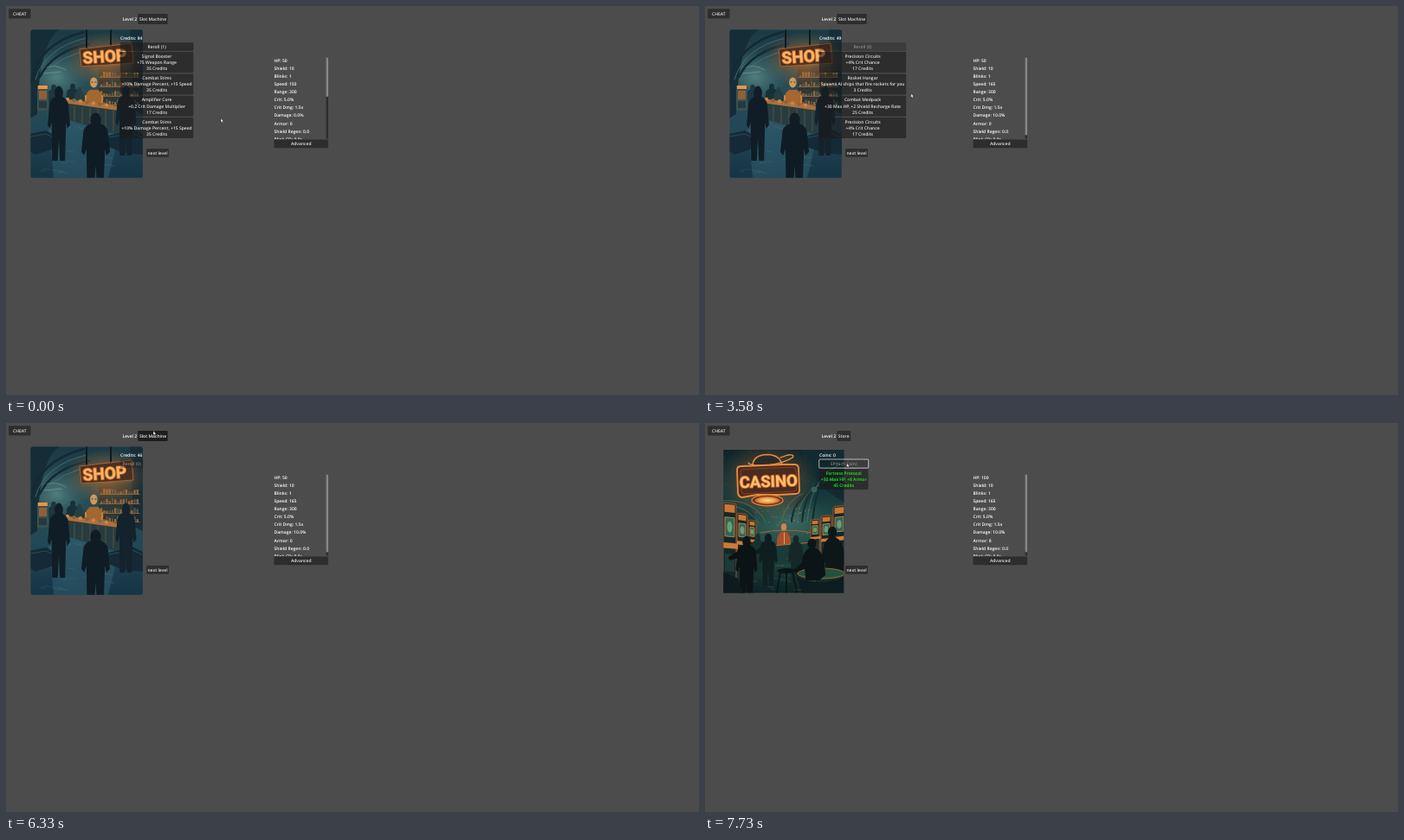
Recreate the animation shown at these times as an HTML page. Size 800 px wide and 450 px high, loop 8 s.

```html
<!DOCTYPE html>
<html lang="en">
<head>
<meta charset="utf-8">
<title>Level shop</title>
<style>
  html, body { margin: 0; width: 100%; height: 100%; overflow: hidden; background: #4c4c4c; }
  #stage { display: block; width: 100vw; height: 100vh; }
  text { font: 600 5px "Open Sans", "Noto Sans", sans-serif; fill: #fff; text-rendering: geometricPrecision; }
  .mid { text-anchor: middle; }
  .sign { font-family: Roboto, sans-serif; font-weight: 700; text-anchor: middle; stroke-linejoin: round; paint-order: stroke; }
</style>
</head>
<body>
<svg id="stage" viewBox="0 0 800 450" xmlns="http://www.w3.org/2000/svg">
  <defs>
    <clipPath id="list"><rect x="309" y="59.4" width="60" height="94.6"/></clipPath>
    <clipPath id="shopEdge"><rect x="28.5" y="27.5" width="129.3" height="171.3" rx="2"/></clipPath>
    <clipPath id="casinoEdge"><rect x="21.3" y="31" width="139" height="165.6"/></clipPath>
    <linearGradient id="shopAir" x2="0" y2="1">
      <stop offset="0" stop-color="#1b3944"/><stop offset=".35" stop-color="#294c55"/>
      <stop offset=".65" stop-color="#224857"/><stop offset="1" stop-color="#153343"/>
    </linearGradient>
    <linearGradient id="casinoAir" x2="0" y2="1">
      <stop offset="0" stop-color="#0f2429"/><stop offset=".3" stop-color="#15363a"/>
      <stop offset=".55" stop-color="#28524a"/><stop offset=".75" stop-color="#1f463f"/><stop offset="1" stop-color="#0c2024"/>
    </linearGradient>
    <radialGradient id="amber"><stop stop-color="#f08a35" stop-opacity=".6"/><stop offset="1" stop-color="#d0702a" stop-opacity="0"/></radialGradient>
    <radialGradient id="mist"><stop stop-color="#74a7a0" stop-opacity=".55"/><stop offset="1" stop-color="#4d807e" stop-opacity="0"/></radialGradient>
    <radialGradient id="lamp"><stop stop-color="#ffd68c"/><stop offset=".6" stop-color="#f0a14b"/><stop offset="1" stop-color="#b9602a"/></radialGradient>
  </defs>
  <g id="shop" clip-path="url(#shopEdge)"></g>
  <g id="casino" clip-path="url(#casinoEdge)"></g>
  <g id="ui"></g>
  <path id="cursor" d="M0 0V4.7L1.1 3.7 1.9 5.4 2.7 5 1.9 3.4H3.4Z" fill="#fff" stroke="#111" stroke-width=".4"/>
</svg>
<script>
const LOOP = 8000;
const $ = id => document.getElementById(id);

// ---- shape helpers ----
const rect = (x, y, w, h, fill, more = '') => `<rect x="${x}" y="${y}" width="${w}" height="${h}" fill="${fill}" ${more}/>`;
const oval = (x, y, rx, ry, fill, more = '') => `<ellipse cx="${x}" cy="${y}" rx="${rx}" ry="${ry}" fill="${fill}" ${more}/>`;
const area = (d, fill, more = '') => `<path d="${d}" fill="${fill}" ${more}/>`;
const line = (d, color, width = 1, more = '') => `<path d="${d}" fill="none" stroke="${color}" stroke-width="${width}" stroke-linecap="round" ${more}/>`;
const label = (x, y, s, more = '') => `<text x="${x}" y="${y + 1.8}" ${more}>${s}</text>`;
const sign = (x, y, turn, size, fill, edge, s) =>
  `<text class="sign" transform="translate(${x} ${y}) rotate(${turn})" style="font-size:${size}px;fill:${fill};stroke:${edge};stroke-width:1.8">${s}</text>`;

function seeded(seed) {
  return () => (seed = (seed * 16807) % 2147483647) / 2147483647;
}

// Silhouettes live in a box 100 units high
const STANDING = 'M-4 13H4Q15 16 17 24L20 52 15 57 13 48 11 100H2L0 70-2 100H-12L-13 48-16 57-20 52-17 24Q-15 16-4 13Z';
const LEANING = 'M-5 17H6Q21 24 24 44L26 70 14 80H-12L-14 58-32 66-36 61-20 46Q-17 24-5 17Z';
const figure = (x, y, h, fill, shape = STANDING, wide = 1) =>
  `<g transform="translate(${x} ${y}) scale(${h / 100 * wide} ${h / 100})" fill="${fill}">
   <ellipse cy="9" rx="${shape === LEANING ? 8.5 : 7.5}" ry="9.5"/><path d="${shape}"/></g>`;

// ---- paintings ----
function paintShop() {
  const rnd = seeded(41);
  let s = rect(28, 27, 131, 173, 'url(#shopAir)');
  s += oval(58, 82, 38, 32, 'url(#mist)');
  s += area('M28 27H62Q38 42 36 125L28 130Z', '#152d37');
  for (let i = 0; i < 4; i++) {
    s += line(`M${29 + i * 5} ${88 - i * 3}Q${36 + i * 9} ${44 + i * 4} ${90 + i * 3} ${30 + i * 7}`, i % 2 ? '#4d7476' : '#122a34', i % 2 ? .8 : 2.5);
  }
  s += line('M47 71Q57 67 69 74M44 78L64 76', '#8bb0a4', .8, 'opacity=".6"');
  // shelves with goods
  s += rect(107, 70, 51, 48, '#2d3837') + area('M143 27H158V125L148 120Z', '#182e36');
  for (const y of [82, 93, 104, 114]) {
    for (let x = 109; x < 153; x += 3.2) {
      const h = 2 + rnd() * 4;
      s += rect(x, y - h, 2.3, h, rnd() > .45 ? '#96673a' : '#52564a');
    }
    s += line(`M108 ${y + .5}H154`, '#a86f3a', .8);
  }
  // hanging sign
  s += oval(115, 62, 48, 32, 'url(#amber)');
  s += line('M93 27V50M121 27V47', '#10191e', 2);
  s += area('M85 50L145 43 147 66 87 70Z', '#4a3022', 'stroke="#a9622e" stroke-width="1" stroke-linejoin="round"');
  s += sign(114.3, 65, -4, 19, '#f9b566', '#c9692c', 'SHOP');
  // keeper and counter
  s += figure(77, 90, 40, '#17313a') + figure(55, 91, 38, '#1b3740') + figure(85, 94, 32, '#243f44');
  s += area('M90 120Q90 101 97 97H106Q113 101 112 121Z', '#a4672f') + oval(101.3, 88.5, 4.2, 6, '#cf9a5c');
  s += line('M99 88H100M103 88H104', '#3a2c25', 1) + line('M92 104Q91 113 99 115M111 104Q113 113 105 116', '#c9853f', 2);
  s += area('M66 110L130 119V148L66 130Z', '#263c41') + area('M66 107L130 116V121L66 112Z', '#b0703a');
  for (let i = 0; i < 7; i++) s += oval(71 + i * 7.5, 108 + i * 1.1, 2.2, 2.2, i % 2 ? '#8e6338' : '#cc8545');
  for (let x = 70; x < 128; x += 9) s += line(`M${x} ${114 + (x - 66) / 8}V${130 + (x - 66) / 4}`, '#b06c36', .7, 'opacity=".6"');
  // left kiosk
  s += rect(36, 92, 13, 29, '#3b514f') + rect(37, 92, 11, 4, '#ef9347') + rect(38, 98, 9, 10, '#8f5f3a') + rect(38, 110, 9, 8, '#233b40');
  // floor
  s += area('M48 124L66 130 130 150 118 199H55Z', '#376777', 'opacity=".45"');
  for (let i = 0; i < 26; i++) {
    const x = 40 + rnd() * 90, y = 138 + rnd() * 55;
    s += line(`M${x} ${y}l${4 + rnd() * 8} ${rnd() * 2}`, i % 3 ? '#4b7b85' : '#b17848', .7, 'opacity=".35"');
  }
  s += area('M28 148L46 144 58 151V164L34 172 28 168Z', '#142a36') + area('M118 150L146 143 158 149V172L136 170 118 163Z', '#142a36');
  s += line('M28 151L46 148 57 153M119 152L146 147 157 152', '#375864', .7);
  s += figure(61, 93, 86, '#101d27', STANDING, .75) + figure(138.5, 93, 80, '#13222b', STANDING, .75);
  s += figure(103.5, 124, 86, '#0f1c26', STANDING, .96);
  return s;
}

function slotMachine(x, y, w, h, lean) {
  return `<g transform="translate(${x} ${y}) skewY(${lean})">`
    + rect(0, 0, w, h, '#13262a', 'rx="2" stroke="#a95a2a" stroke-width=".9"')
    + rect(1.5, 1.5, w - 3, h * .1, '#c97733') + rect(2, h * .18, w - 4, h * .24, '#2f6656', 'stroke="#e08a3f" stroke-width=".8"')
    + oval(w / 2, h * .3, w * .2, h * .07, '#6d9c72')
    + rect(0, h * .5, w + 2, h * .07, '#cf7a38', 'rx="1"') + rect(2, h * .64, w - 4, h * .22, '#1d3a39') + '</g>';
}

function paintCasino() {
  const rnd = seeded(77);
  let s = rect(21, 31, 140, 166, 'url(#casinoAir)');
  for (let i = 0; i < 60; i++) s += oval(22 + rnd() * 138, 32 + rnd() * 60, .35, .35, '#6d9b8e', 'opacity=".6"');
  s += oval(98, 112, 45, 30, 'url(#mist)', 'opacity=".55"');
  // vaulted hall
  s += area('M112 31Q116 66 161 92V31Z', '#122b30') + area('M21 84Q52 84 60 116L21 120Z', '#17383a');
  for (let i = 0; i < 5; i++) {
    s += line(`M${100 + i * 6} 114Q${102 + i * 7} ${76 - i * 6} 161 ${70 - i * 8}`, i % 2 ? '#4a7a6b' : '#122d30', i % 2 ? .7 : 2);
  }
  s += line('M21 90Q56 88 70 114M21 96Q48 94 62 116', '#47766a', .8);
  s += line('M88 114Q94 90 112 82', '#8a6a42', .7) + oval(126, 77, 3.5, 3.5, '#31605a');
  for (let i = 0; i < 45; i++) s += rect(58 + rnd() * 68, 98 + rnd() * 34, 1.6, 1, rnd() > .5 ? '#bd7237' : '#447565', 'opacity=".75"');
  // neon sign
  s += oval(72, 66, 58, 46, 'url(#amber)', 'opacity=".75"');
  s += area('M55 50Q55 37 72 36.5 87 37 89 49Z', '#2a2b29', 'stroke="#e8833a" stroke-width="1.7"');
  s += line('M50 46Q52 50 72 49 92 46 101 40 104 36 96 37L87 40', '#f09a4c', 1.3);
  s += area('M37 54Q37 50 42 50L55 49.5 90 48 103 48Q108 48 108 53L109 78Q109 82 104 82L86 83H60L43 86Q39 86 38 81Z', '#4a2b20', 'stroke="#f08a3a" stroke-width="1.8"');
  s += area('M41 57Q41 53.5 45 53.5L101 51Q105 51 105 55L106 75Q106 79 102 79L46 82Q42 82 42 78Z', 'none', 'stroke="#96502a" stroke-width=".7"');
  s += sign(73.5, 74, -2, 18.5, '#ffc06c', '#c4622a', 'CASINO');
  s += oval(72, 89.5, 18, 6.3, '#6b3620', 'stroke="#ec8236" stroke-width="1.2"') + oval(72, 89.5, 14.5, 4.4, 'url(#lamp)');
  // back bar
  s += line('M64 127Q92 121 124 127', '#a8632f', 1.2);
  s += area('M83 142Q82 128 89 126H94Q100 129 99 142Z', '#a9502c') + oval(91, 120.5, 3.2, 4.3, '#c98653') + line('M91.5 127V140', '#e0a05a', 1);
  s += area('M78 142L126 138V158L78 164Z', '#1a3b37') + line('M79 142L125 138', '#b3693a', 1);
  for (let i = 0; i < 30; i++) {
    const x = 48 + rnd() * 90, y = 156 + rnd() * 38;
    s += line(`M${x} ${y}l${4 + rnd() * 8} 0`, i % 3 ? '#3a6a5b' : '#a1683b', .8, 'opacity=".45"');
  }
  s += slotMachine(50, 112, 9, 44, 8) + slotMachine(37, 104, 12, 64, 8) + slotMachine(21, 92, 15, 92, 5);
  s += slotMachine(122, 112, 10, 40, -5) + slotMachine(134, 108, 12, 52, -6) + slotMachine(148, 97, 14, 70, -7);
  // gamblers
  s += figure(105, 130, 56, '#142927', STANDING, .8) + figure(61, 128, 50, '#193230', STANDING, .75);
  s += figure(73, 128, 60, '#0f1f1f', STANDING, .9) + area('M66 142L56 149 58 153 70 147Z', '#0f1f1f');
  s += figure(147, 120, 70, '#0d1718', LEANING, .85);
  s += area('M106 178Q134 190 160 178V197H112Z', '#0d1c1f') + oval(134, 174, 27, 6, '#23523f', 'stroke="#a9683a" stroke-width="1"');
  s += figure(123.5, 134, 60, '#0b1416', LEANING);
  s += oval(94, 171, 11, 3, '#0b1416') + line('M87 172L83 196M94 172V196M101 172L106 196', '#0b1416', 1.8);
  s += figure(48, 131, 74, '#0b1315', STANDING, .85) + area('M40 147L27 155 28 159 44 155Z', '#0b1315');
  return s + area('M21 172L38 180 44 197H21Z', '#0d1b1e');
}

$('shop').innerHTML = paintShop();
$('casino').innerHTML = paintCasino();

// ---- timing ----
const MOVES = [
  [0, 248, 130], [360, 248, 130], [900, 211.5, 138], [1400, 211.5, 138], [1880, 146, 46.5], [2150, 146, 46.5],
  [2500, 247, 104], [3420, 247, 104], [3770, 226, 98], [4030, 226, 98], [4490, 219.5, 91.5], [5940, 219.5, 91.5],
  [6180, 170, 9.3], [6440, 170, 9.3], [6920, 160, 45], [7150, 160, 45], [7350, 163.5, 46.5], [LOOP, 163.5, 46.5],
];
const BUY = 1330, REROLL = 2150, BUY_MORE = 5180, TO_CASINO = 6400, SPIN = 7560;
const CLICK_ENDS = [BUY, REROLL, BUY_MORE, TO_CASINO, SPIN];
const PRESS = 70;

const STIMS = ['Combat Stims', '+10% Damage Percent, +15 Speed', '35 Credits'];
const CIRCUITS = ['Precision Circuits', '+4% Crit Chance', '17 Credits'];
const FIRST_STOCK = [
  ['Signal Booster', '+75 Weapon Range', '35 Credits'], STIMS,
  ['Amplifier Core', '+0.2 Crit Damage Multiplier', '17 Credits'], STIMS,
];
const SECOND_STOCK = [
  CIRCUITS, ['Rocket Hangar', 'Spawns AI ships that fire rockets for you', '3 Credits'],
  ['Combat Medpack', '+30 Max HP, +2 Shield Recharge Rate', '25 Credits'], CIRCUITS,
];

function cursorAt(t) {
  const i = MOVES.findIndex(m => m[0] > t);
  const [t0, x0, y0] = MOVES[i - 1], [t1, x1, y1] = MOVES[i];
  const p = (t - t0) / (t1 - t0), e = p * p * (3 - 2 * p);
  return [x0 + (x1 - x0) * e, y0 + (y1 - y0) * e];
}

// ---- interface ----
function interfaceAt(t, [cx, cy]) {
  const pressed = CLICK_ENDS.some(end => t >= end - PRESS && t < end);
  const inCasino = t >= TO_CASINO;

  function button(x, y, w, h, lines, { off = false, focus = false, color } = {}) {
    const over = !off && cx >= x && cx <= x + w && cy >= y && cy <= y + h;
    const fill = off ? 'rgba(26,26,26,.3)' : over ? (pressed ? 'rgba(0,0,0,.6)' : 'rgba(57,57,57,.6)') : 'rgba(26,26,26,.6)';
    const ink = color || (off ? 'rgba(223,223,223,.5)' : over ? '#f2f2f2' : '#e4e4e4');
    let s = rect(x, y, w, h, fill, 'rx="1"');
    if (focus) s += rect(x - .2, y - .2, w + .4, h + .4, 'none', 'rx="1" stroke="#fff" stroke-opacity=".8" stroke-width=".8"');
    lines.forEach((row, i) => {
      s += label(x + w / 2, y + h / 2 + (i - (lines.length - 1) / 2) * 7.19, row, `class="mid" style="fill:${ink}"`);
    });
    return s;
  }

  let s = button(3.1, 3.2, 25.4, 11.3, ['CHEAT']) + label(134.5, 15.2, 'Level 2');

  if (inCasino) {
    const spun = t >= SPIN, spinFocus = t >= SPIN - PRESS;
    s += button(152.3, 9, 15.8, 12, ['Store'], { focus: !spinFocus });
    s += label(132, 37.2, `Coins: ${spun ? 0 : 1}`);
    s += button(131.9, 42.2, spun ? 56.6 : 35, 9.7, ['SPIN (1 Coin)'], { off: spun, focus: spinFocus });
    if (spun) s += button(131.9, 53.1, 56.6, 24, ['Fortress Protocol', '+50 Max HP, +8 Armor', '45 Credits'], { color: '#1cfa1c' });
  } else {
    const stock = t < BUY ? FIRST_STOCK : t >= REROLL && t < BUY_MORE ? SECOND_STOCK : [];
    const width = !stock.length ? 26.4 : t < BUY ? 84.4 : 100.3;
    const rerolls = t < REROLL ? 1 : 0;
    s += button(152.3, 9, 34.4, 12, ['Slot Machine']);
    s += label(132, 37.2, `Credits: ${t < BUY ? 84 : t < BUY_MORE ? 49 : 46}`);
    s += button(131.9, 42.2, width, 9.7, [`Reroll (${rerolls})`], { off: !rerolls });
    stock.forEach((item, i) => { s += button(131.9, 53.1 + i * 25.31, width, 24.06, item); });
  }
  s += button(162, 165, 26, 9.7, ['next level']);

  const bought = t >= BUY, won = t >= SPIN;
  const stats = [
    `HP: ${won ? 100 : 50}`, 'Shield: 10', 'Blinks: 1', `Speed: ${bought ? 165 : 150}`, 'Range: 300', 'Crit: 5.0%', 'Crit Dmg: 1.5x',
    `Damage: ${bought ? '10.0' : '0.0'}%`, `Armor: ${won ? 8 : 0}`, 'Shield Regen: 0.0', 'Blink CD: 0.0s',
  ];
  s += '<g clip-path="url(#list)">' + stats.map((row, i) => label(309.5, 63.2 + i * 9.07, row)).join('') + '</g>';
  s += rect(369.5, 59.4, 2.5, 94, 'rgba(26,26,26,.6)', 'rx="1"') + rect(369.5, 59.4, 2.5, bought ? 90 : 45.6, '#878787', 'rx="1"');
  return s + button(309.5, 154.6, 62.5, 9.7, ['Advanced']);
}

let shown = '';
const start = performance.now();

function draw() {
  const t = (performance.now() - start) % LOOP;
  const pos = cursorAt(t), ui = interfaceAt(t, pos);
  if (ui !== shown) $('ui').innerHTML = shown = ui;
  $('shop').style.display = t < TO_CASINO ? '' : 'none';
  $('casino').style.display = t < TO_CASINO ? 'none' : '';
  $('cursor').setAttribute('transform', `translate(${pos[0]} ${pos[1]})`);
  requestAnimationFrame(draw);
}
draw();
</script>
</body>
</html>
```
